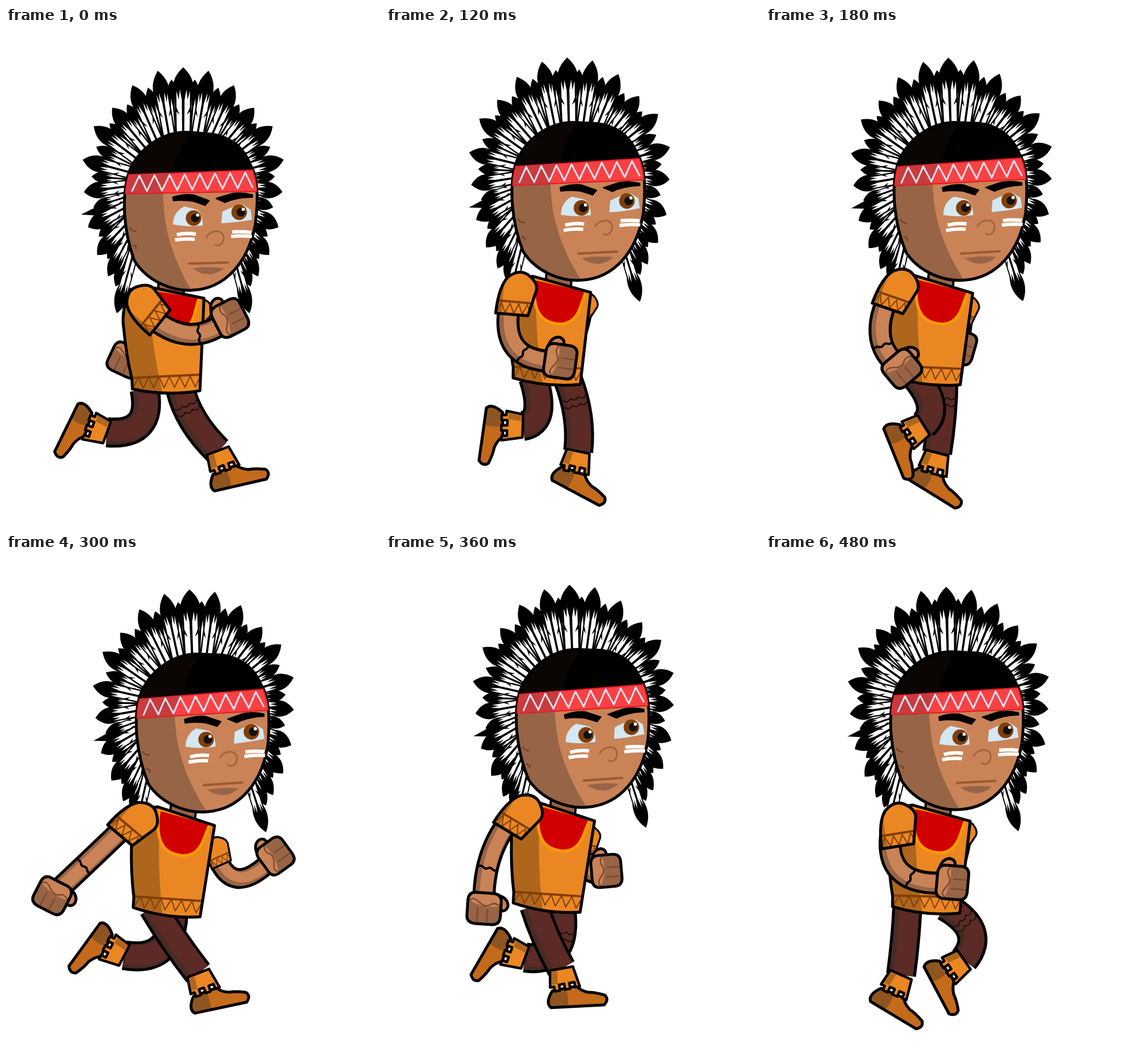
An HTML page with a canvas for the animation above (540 ms loop, 648 by 864 pixels).

```html
<!DOCTYPE html>
<html lang="en">
<head>
<meta charset="utf-8">
<title>Running character</title>
<style>
html, body { margin: 0; width: 100%; height: 100%; overflow: hidden; background: #fff; }
canvas { display: block; width: 648px; height: 864px; }
</style>
</head>
<body>
<canvas id="stage" width="648" height="864"></canvas>
<script>
const ctx = document.getElementById('stage').getContext('2d');
const SKIN = '#c98357', SKIN_DARK = '#976446', ORANGE = '#eb8722', ORANGE_DARK = '#ae661d';
const BROWN = '#803f08', TROUSERS = '#5c2b26', TROUSERS_DARK = '#472b24';
const BOOT = '#c46a1b', BOOT_DARK = '#8f5420', EYE = '#d4e7f2';

const STEP = 60, LOOP = 540;
const keyTimes = [0, 120, 240, 300, 360, 480, 540];

// One row per key time. Head and torso: x, y, angle.
const headKeys = [[286, 455, 0], [303, 438.5, -1.5], [313, 439, -2.4], [313, 447, -2.4], [313, 439, -2.4], [300.5, 442.5, -1.4]];
const torsoKeys = [[278, 625, 0], [279, 610, 4], [279, 609, 6.5], [279, 617, 6.5], [279, 609, 6.5], [278, 613, 4]];
// Arms: shoulder x, y, sleeve angle, elbow x, y, fist x, y, angle.
const nearArmKeys = [
  [231, 481, -51, 312, 568, 388, 502, -27], [222, 450, 5, 180, 583, 302, 577, 8],
  [229, 434, 33, 150, 500, 169, 603, 92], [227, 450, 40, 160, 515, 80, 590, 117],
  [234, 438, 31, 165, 505, 170, 612, 94], [221, 459, -9, 190, 580, 323, 567, 5]];
const farArmKeys = [
  [333, 485, 30, 300, 600, 207, 575, 115], [342, 475, 20, 330, 570, 290, 560, 40],
  [346, 487, 5, 335, 565, 381, 545, -8], [361, 509, -24, 388, 605, 467, 521, -36],
  [346, 487, 5, 335, 570, 382, 547, -5], [340, 477, 20, 330, 570, 290, 560, 40]];
// Legs: hip x, y, knee x, y, ankle x, y, cuff angle, foot angle.
const farLegKeys = [
  [302, 625, 315, 681, 367, 732, -21, -13], [315, 608, 340, 673, 333, 733, 12, 28],
  [300, 608, 274, 667, 260, 738, 17, 35], [290, 610, 292, 708, 205, 693, 117, 126],
  [303, 608, 318, 708, 241, 697, 110, 120], [310, 608, 384, 650, 343, 701, 55, 62]];
const nearLegKeys = [
  [240, 625, 256, 707, 175, 700, 110, 116], [255, 605, 280, 683, 237, 689, 92, 98],
  [265, 605, 329, 635, 309, 686, 24, 38], [255, 610, 290, 669, 333, 724, -21, -12],
  [257, 608, 274, 662, 304, 716, -10, -3], [245, 608, 242, 668, 234, 727, 24, 31]];

// Left half of the headdress: tip x, y, base x, y.
const plumes = [
  [192, 494, 222, 385], [177, 430, 222, 345], [158, 393, 222, 325], [142, 345, 222, 303],
  [135, 284, 225, 272], [133, 228, 230, 254], [152, 170, 238, 235], [184, 138, 250, 218],
  [219, 99, 265, 203], [263, 74, 284, 194]];

function poseAt(keys, time) {
  let i = 0;
  while (time >= keyTimes[i + 1]) i++;
  const mix = (time - keyTimes[i]) / (keyTimes[i + 1] - keyTimes[i]);
  const next = keys[(i + 1) % keys.length];
  return keys[i].map((v, k) => v + (next[k] - v) * mix);
}

function shape(path, fill, stroke, width = 5) {
  const p = new Path2D(path);
  if (fill) { ctx.fillStyle = fill; ctx.fill(p); }
  if (stroke) { ctx.strokeStyle = stroke; ctx.lineWidth = width; ctx.stroke(p); }
}

const line = (path, color, width) => shape(path, null, color, width);

function dot(x, y, r, color) {
  ctx.fillStyle = color;
  ctx.beginPath();
  ctx.arc(x, y, r, 0, 7);
  ctx.fill();
}

function placed(x, y, degrees, draw, scale = 1) {
  ctx.save();
  ctx.translate(x, y);
  ctx.rotate(degrees * Math.PI / 180);
  ctx.scale(scale, scale);
  draw();
  ctx.restore();
}

function clipped(path, draw) {
  ctx.save();
  ctx.clip(new Path2D(path));
  draw();
  ctx.restore();
}

function zigzag(x, step, count, yA, yB, slope = 0) {
  let path = '';
  for (let i = 0; i <= count; i++)
    path += `${i ? 'L' : 'M'}${x + i * step} ${(i % 2 ? yB : yA) + i * slope}`;
  return path;
}

function limb([x0, y0, x1, y1, x2, y2], width, light, dark) {
  const path = `M${x0} ${y0}Q${x1} ${y1} ${x2} ${y2}`;
  line(path, '#000', width);
  line(path, dark, width - 10);
  ctx.save();
  ctx.translate(3.5, -2);
  line(path, light, width - 18);
  ctx.restore();
}

// Draws across a limb at position t, with x along the limb.
function across([x0, y0, x1, y1, x2, y2], t, draw) {
  const u = 1 - t;
  const at = (a, b, c) => u * u * a + 2 * u * t * b + t * t * c;
  const slope = (a, b, c) => u * (b - a) + t * (c - b);
  const angle = Math.atan2(slope(y0, y1, y2), slope(x0, x1, x2)) * 180 / Math.PI;
  placed(at(x0, x1, x2), at(y0, y1, y2), angle, draw);
}

function plume(tipX, tipY, baseX, baseY, half) {
  const dx = tipX - baseX, dy = tipY - baseY, len = Math.hypot(dx, dy), tip = len * .42;
  const y = f => -len + tip * f, edge = half * .8;
  placed(baseX, baseY, Math.atan2(dx, -dy) * 180 / Math.PI, () => {
    shape(`M0 ${-len}Q${-half * 1.4} ${y(.45)} ${-edge} ${y(1)}L${-edge} 0H${edge}V${y(1)}Q${half * 1.4} ${y(.45)} 0 ${-len}`, '#000');
    for (const s of [-1, 1]) {
      const vane = [[.13, 1.1], [.33, .75], [.42, 1.1], [.65, .8], [.65, 1.35], [.35, 1.6], [.65, 1.5]];
      shape('M' + vane.map(([x, f]) => `${s * x * half} ${y(f)}`).join('L') + `L${s * .6 * half} 0H${s * 1.8}Z`, '#fff');
    }
  });
}

function headdress() {
  shape('M130 323L158 309L190 316L176 326Z', '#000');
  shape('M164 310L178 303L188 314Z', '#d31818');
  const half = flip => {
    ctx.save();
    if (flip) { ctx.translate(614, 0); ctx.scale(-1, 1); }
    plumes.forEach((a, i) => {
      const b = plumes[i + 1] || [307, 68, 307, 190];
      const [tx, ty, bx, by] = a.map((v, k) => (v + b[k]) / 2);
      plume(tx + (bx - tx) * .15, ty + (by - ty) * .15, bx, by, 11);
    });
    plumes.forEach((p, i) => plume(...p, i < 2 ? 12 : 14.5));
    ctx.restore();
  };
  half(false);
  half(true);
  plume(307, 68, 307, 190, 18);
}

const FACE = 'M322 181C270 176 228 212 213 250C200 290 203 350 222 402C245 440 290 456 322 454C380 452 420 405 432 340C437 300 438 260 424 238C408 195 370 183 345 183Z';

function head() {
  headdress();
  shape(FACE, SKIN);
  clipped(FACE, () => {
    shape('M190 170H300Q268 270 273 300Q274 375 322 456H190Z', SKIN_DARK);
    shape('M190 160H450V248L190 257Z', '#000');
    shape('M190 160H345Q297 200 290 251L190 257Z', '#0b0503');
    line('M214 345q4 7 12 7M219 376q8 0 6 6', '#704127', 2.5);
  });
  line(FACE, '#000', 5);
  shape('M213 254L427 246Q434 264 434 283L207 287Q208 270 213 254Z', '#f94144', '#e5191f', 2);
  shape('M214 255L290 251Q275 266 273 285L208 286Z', '#c93b3d');
  line(zigzag(218, 13.1, 16, 283, 256, -.38), '#dae1ee', 3);

  shape('M289 293Q306 287 325 289L352 299L345 307L325 300Q305 297 290 299Z', '#000', '#000', 2);
  shape('M364 295L379 302Q400 293 427 293V289Q409 284 391 287Z', '#000', '#000', 2);
  shape('M289 340Q290 318 309 309L329 314Q341 319 341 342Q312 345 289 340Z', EYE);
  shape('M373 338L375 318Q392 309 411 306L424 315L426 332Q398 337 373 338Z', EYE);
  for (const [x, y] of [[325, 329], [404, 319]]) {
    dot(x, y, 13.5, BROWN);
    dot(x + 3, y, 7.5, '#111');
    dot(x + 7, y - 5, 2.8, '#fff');
  }
  line('M296 358Q312 354 329 357M293 367Q310 364 327 366M392 353Q410 352 425 354M390 361Q408 359 426 361', '#fff', 6);
  line('M347 363C354 348 379 348 377 365C375 377 366 379 361 374', '#a3643c', 3);
  line('M316 408L386 406', '#9d5832', 4);
  shape('M323 416Q350 412 378 416Q352 437 323 416Z', SKIN_DARK);
}

const TUNIC = 'M-63 -172Q-79 -135 -74 -105Q-70 -60 -60 -18L-59 0Q0 13 58 3L65 -157L-37 -178Z';

function torso() {
  shape(TUNIC, ORANGE);
  clipped(TUNIC, () => {
    shape('M-90 -185H-32Q-28 -80 -5 15H-90Z', ORANGE_DARK);
    line(zigzag(-58, 9, 13, -1, -20, -.2), BROWN, 2);
    line('M-64 -19L64 -25', BROWN, 4);
    shape('M-33 -174Q-36 -110 -2 -101Q40 -90 50 -135L57 -160Z', '#d10000', '#ff9a05', 5);
  });
  line(TUNIC, '#000', 5);
}

function neck() {
  shape('M-14 -205H30V-163H-14Z', SKIN_DARK, '#000', 4);
}

const SLEEVE = 'M-28 46Q-27 0 -12 -18Q8 -36 26 -22Q40 -12 39 0L28 46Z';

function sleeve() {
  shape(SLEEVE, ORANGE);
  clipped(SLEEVE, () => {
    shape('M-40 -40H-12Q-22 10 -16 50H-40Z', ORANGE_DARK);
    line('M-30 24H36', BROWN, 4);
    line(zigzag(-27, 7.5, 8, 44, 27), BROWN, 2);
  });
  line(SLEEVE, '#000', 5);
}

const FIST = 'M-14 -29H14Q27 -28 27 -15V15Q26 29 13 29H-14Q-27 28 -27 16V-16Q-26 -28 -14 -29Z';

function fist() {
  shape('M-25 -20Q-22 -40 -7 -41Q6 -38 0 -24Z', SKIN, '#000', 5);
  shape(FIST, SKIN);
  clipped(FIST, () => {
    shape('M-6 -30H30V30H-14Q2 0 -6 -30Z', SKIN_DARK);
    line('M-5 -28q-8 10 -2 18t-4 20t2 18M1 -6H24M-2 11H24', '#7d4a2c', 2.5);
  });
  line(FIST, '#000', 5);
}

function arm([sx, sy, sleeveAngle, ex, ey, fx, fy, fistAngle], near) {
  const curve = [sx, sy, ex, ey, fx, fy];
  limb(curve, near ? 40 : 36, SKIN, SKIN_DARK);
  if (near) across(curve, .65, () => line('M0 -17q3 4 0 8t0 8t0 8t0 8', '#000', 4));
  placed(sx, sy, sleeveAngle, sleeve, near ? 1 : .65);
  placed(fx, fy, fistAngle, fist, near ? 1 : .96);
}

const FOOT = 'M-22 2Q-36 22 -26 31H66Q76 22 68 14Q50 8 40 8Q26 4 20 -4Z';

function leg([hx, hy, kx, ky, ax, ay, cuffAngle, footAngle], scallops) {
  const curve = [hx, hy, kx, ky, ax, ay];
  limb(curve, 52, TROUSERS, TROUSERS_DARK);
  if (scallops) across(curve, .28, () =>
    line('M-4 -21q8 6 0 13q8 7 0 14q8 7 0 14M8 -21q8 6 0 13q8 7 0 14q8 7 0 14', '#1f0d0a', 2));
  placed(ax, ay, cuffAngle, () => {
    placed(0, 36, footAngle - cuffAngle, () => {
      shape(FOOT, BOOT);
      clipped(FOOT, () => shape('M-40 -6H-2Q8 12 2 34H-40Z', BOOT_DARK));
      line(FOOT, '#000', 5);
    });
    shape('M-20 0H20L26 36H18V27H9V37H0V27H-9V37H-18V29H-25Z', ORANGE, '#000', 4.5);
    shape('M-18 3H-8L-11 25H-22Z', ORANGE_DARK);
  });
}

function frame(now) {
  const time = Math.floor(now % LOOP / STEP) * STEP;
  const body = poseAt(torsoKeys, time), [hx, hy, tilt] = poseAt(headKeys, time);
  ctx.fillStyle = '#fff';
  ctx.fillRect(0, 0, 648, 864);
  ctx.lineJoin = 'round';
  arm(poseAt(farArmKeys, time), false);
  leg(poseAt(farLegKeys, time), true);
  leg(poseAt(nearLegKeys, time), false);
  placed(...body, neck);
  placed(hx, hy, tilt, () => { ctx.translate(-286, -455); head(); });
  placed(...body, torso);
  arm(poseAt(nearArmKeys, time), true);
}

const start = performance.now();
function loop() {
  frame(performance.now() - start);
  requestAnimationFrame(loop);
}
loop();
</script>
</body>
</html>
```
